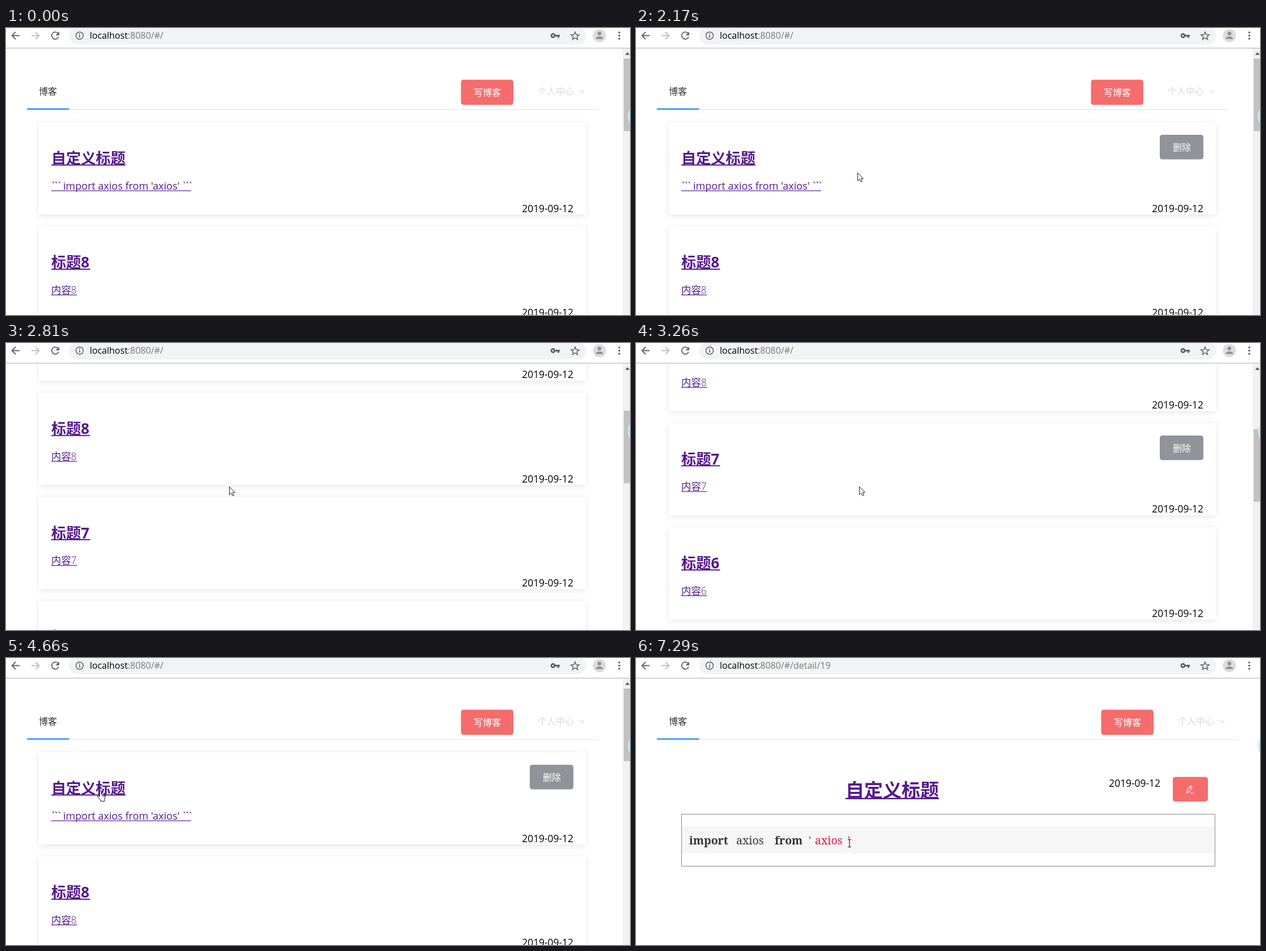
An HTML page for the animation above (8000 ms loop, 1102 by 508 pixels).

```html
<!DOCTYPE html>
<html lang="zh-CN">
<head>
<meta charset="utf-8">
<style>
html, body { margin: 0; width: 100%; height: 100%; overflow: hidden; background: #fff; }
svg { display: block; width: 1102px; height: 508px; }
text { font: 16px "Open Sans", "Noto Sans CJK SC", "Noto Sans CJK", sans-serif; white-space: pre; }
.thin { font-weight: 300; }
.link { fill: #551a8b; }
.link .h { font-size: 26.2px; font-weight: 700; }
.link .p { font-size: 17.4px; }
.date { font-size: 17.4px; text-anchor: end; }
.card { fill: #fff; filter: drop-shadow(0 2px 6px rgba(0,0,0,.1)); }
.code { font: 19.5px "Noto Serif", serif; fill: #333; }
.b { font-weight: 700; }
.line { fill: none; stroke: #5f6368; stroke-width: 1.8; }
</style>
</head>
<body>
<svg viewBox="0 0 1102 508">
  <g id="page">
    <text class="thin" x="58" y="118" fill="#303133">博客</text>
    <rect id="rule" x="37" y="144" height="1" fill="#e4e4e4"/>
    <rect x="37" y="142" width="74.500" height="2.800" fill="#409eff"/>
    <g id="menu">
      <rect x="803.500" y="91.500" width="92.500" height="44.500" rx="4.500" fill="#f56c6c"/>
      <text class="thin" x="826" y="120" fill="#fff">写博客</text>
      <text class="thin" x="939" y="118" fill="#d8d8d8">个人中心</text>
      <path d="M1013 110.500l4 4 4-4" fill="none" stroke="#d8d8d8" stroke-width="1.200"/>
    </g>
    <g id="cards"></g>
  </g>

  <g id="detail">
    <g id="empty">
      <rect x="80.500" y="210.500" width="942" height="2" fill="#eee" stroke="#888"/>
    </g>
    <text class="date" x="926" y="228">2019-09-12</text>
    <rect x="948" y="210.500" width="62" height="43.500" rx="4.500" fill="#f56c6c"/>
    <path d="M973 239l.5-4.500 5.500-8.500 3.500 2.200-5.500 8.500zM977.500 228.300l3.500 2.200M979 239.300h6" fill="none" stroke="#fff" stroke-width="1.100"/>
    <g id="article">
      <text class="link b" x="370" y="246" style="font-size:33px">自定义标题</text>
      <rect class="link" x="370" y="247.500" width="165" height="2.500"/>
      <rect x="80.500" y="276.500" width="942" height="92" fill="#fff" stroke="#888"/>
      <rect x="81" y="298" width="941" height="48" fill="#f6f6f6"/>
      <text class="code b" x="94" y="330">import</text>
      <text class="code" x="177" y="330">axios</text>
      <text class="code b" x="245" y="330">from</text>
      <text class="code" y="330" style="fill:#d14"><tspan x="305">'</tspan><tspan x="316">axios</tspan><tspan x="374">'</tspan></text>
    </g>
  </g>

  <g id="bar">
    <rect x="1089" y="36" width="13" height="472" fill="#f1f1f1"/>
    <path d="M1093.500 47.500h8l-4-4.500z" fill="#505050"/>
    <rect id="thumb" x="1091" y="54" width="11" height="128.500" fill="#c1c1c1"/>
  </g>
  <circle cx="1122" cy="156" r="24" fill="#b5f8ee" opacity=".85"/>

  <rect width="1102" height="36" fill="#fff"/>
  <rect y="35" width="1102" height="1.200" fill="#b8b8b8"/>
  <rect x="111" y="-2" width="914" height="31" rx="15.500" fill="#f1f3f4"/>
  <path class="line" d="M24 13.500H11M17 7l-6.500 6.500 6.500 6.500"/>
  <path class="line" d="M45 13.500h13M52 7l6.500 6.500-6.500 6.500" style="stroke:#bdbfc1"/>
  <path class="line" d="M92 9.500a6.300 6.300 0 1 0 1 6"/>
  <path d="M94 6.500v6.500h-6.500z" fill="#5f6368"/>
  <circle class="line" cx="130" cy="13.500" r="6.500" style="stroke-width:1.500"/>
  <path class="line" d="M130 12.500v4.500M130 9.500v1.700"/>
  <text x="148" y="19">localhost<tspan id="path" fill="#777"></tspan></text>
  <circle class="line" cx="966" cy="13.500" r="3" style="stroke-width:2.800"/>
  <path class="line" d="M969 13.500h9M975.500 13v4.500" style="stroke-width:2.800"/>
  <path class="line" d="M1005 7l2 4.700 5.200.4-4 3.300 1.300 5-4.500-2.700-4.500 2.700 1.300-5-4-3.300 5.200-.4z" style="stroke-width:1.500"/>
  <circle cx="1048" cy="13.500" r="11.500" fill="#dcdcdc"/>
  <circle cx="1048" cy="9.800" r="3.300" fill="#909090"/>
  <path d="M1041.500 19.500c0-6 13-6 13 0z" fill="#909090"/>
  <g fill="#5f6368"><circle cx="1083" cy="8" r="1.800"/><circle cx="1083" cy="13.500" r="1.800"/><circle cx="1083" cy="19" r="1.800"/></g>

  <g id="cursor" stroke-linejoin="round">
    <path id="arrow" d="M.5.5v14l3.300-3 2.300 5 2.300-1-2.200-4.900h4.200z" fill="#fff" stroke="#223"/>
    <path id="hand" d="M-1.500 1.500q1.500-2 3 0v6l5 1.200q2 .5 2 2.500l-1.500 5v3.300h-7v-2l-5.500-6.500q0-2 2-1.200l2 1.700zM4 8.500v3M6.500 9v3" fill="#fff" stroke="#111"/>
    <path id="beam" d="M-3-6.500h2.200l.8.700.8-.7H3M-3 6.500h2.200l.8-.7.8.7H3M0-6V6" fill="none" stroke="#222" stroke-width="1.200"/>
  </g>
</svg>
<script>
const $ = id => document.getElementById(id);
const LOOP = 8000, TOP = 167, PITCH = 184.4, CARD_H = 163;

// Bursts of movement: first change, last change, number of steps
const bursts = [[70, 850, 11], [1030, 1240, 4], [2170, 2400, 4], [2570, 3110, 8], [3260, 3260, 1],
  [3490, 3730, 4], [3940, 4660, 11], [5140, 5140, 1], [5290, 5670, 6], [6680, 6980, 5], [7290, 7290, 1]];

// time, x, y
const moves = [[70, 430, 489], [300, 340, 385], [600, 205, 262], [850, 166, 218], [1030, 176, 224],
  [1170, 290, 273], [1240, 352, 264], [2170, 391, 256], [2250, 397, 243], [2400, 394, 254],
  [4170, 394, 254], [4450, 235, 242], [4660, 167, 234], [5290, 190, 246], [5670, 371, 333],
  [6680, 363, 333], [6755, 351, 331], [6980, 376, 326], [7290, 377, 328]];

// time, scroll offset
const scrolls = [[2400, 0], [2570, 40], [2801, 263], [3110, 394], [3400, 394], [3490, 345],
  [3730, 126], [3940, 90], [4156, 0]];

function snap(t) {
  let now = 0;
  for (const [a, b, n] of bursts) {
    if (t < a) break;
    const step = (b - a) / (n - 1) || 1;
    now = t >= b ? b : a + Math.floor((t - a) / step) * step;
  }
  return now;
}

function at(keys, t) {
  const i = keys.findIndex(k => k[0] > t);
  if (i === 0) return keys[0].slice(1);
  if (i < 0) return keys.at(-1).slice(1);
  const [t0, ...from] = keys[i - 1], [t1, ...to] = keys[i];
  return from.map((v, j) => v + (to[j] - v) * (t - t0) / (t1 - t0));
}

function card(i) {
  const head = i ? `标题${9 - i}` : '自定义标题';
  const body = i ? `内容${9 - i}` : `<tspan x="78.5" letter-spacing="-4.7">\`\`\`</tspan>` +
    `<tspan x="101" font-size="18">import axios from 'axios'</tspan><tspan x="310" letter-spacing="-4.7">\`\`\`</tspan>`;
  return `<g transform="translate(0 ${TOP + i * PITCH})">
    <rect class="card" x="58" width="966" height="${CARD_H}"/>
    <g class="link"><g class="title">
      <text class="h" x="80" y="73">${head}</text>
      <rect x="80" y="74.500" width="${i ? 68.5 : 131}" height="2"/></g>
      <text class="p${i ? ' thin' : ''}" x="80" y="118.500">${body}</text>
      <rect x="80" y="120.500" width="${i ? 45.5 : 247}" height="1.200"/></g>
    <text class="date" x="1002" y="158.500">2019-09-12</text>
    <g class="del"><rect x="925" y="22" width="77" height="43.500" rx="4.500" fill="#909399"/>
      <text class="thin" x="948" y="50" fill="#fff">删除</text></g></g>`;
}

$('cards').innerHTML = Array.from({ length: 9 }, (_, i) => card(i)).join('');
const dels = document.querySelectorAll('.del');
const title = document.querySelector('.title');
const show = (el, on) => { el.style.display = on ? '' : 'none'; };
const shift = (id, x, y) => $(id).setAttribute('transform', `translate(${x} ${y})`);

function draw(ms) {
  const t = snap(ms % LOOP);
  const [x, y] = at(moves, t), [s] = at(scrolls, t);
  const detail = t >= 5290, loaded = t >= 7290;

  show($('cards'), !detail);
  show($('bar'), !detail);
  show($('detail'), detail);
  show($('empty'), !loaded);
  show($('article'), loaded);
  shift('page', 0, -s);
  shift('thumb', 0, s * .25);
  shift('menu', detail ? 18 : 0, 0);
  $('rule').setAttribute('width', detail ? 1027 : 1009);
  $('path').textContent = detail ? ':8080/#/detail/19' : ':8080/#/';
  title.style.fill = t >= 5140 ? '#f00' : '';

  // Hover is refreshed only while the page rests
  const resting = s === 0 || (t >= 3260 && t < 3490);
  dels.forEach((el, i) => {
    const dy = y + s - TOP - i * PITCH;
    show(el, t >= 70 && resting && dy >= 0 && dy <= CARD_H);
  });

  const over = (w, y0, y1) => x >= 80 && x <= 80 + w && y >= y0 && y <= y1;
  const hand = !detail && s === 0 && (over(131, 212, 250) || over(247, 266, 290));
  show($('cursor'), t >= 70);
  show($('hand'), hand);
  show($('beam'), loaded);
  show($('arrow'), !hand && !loaded);
  shift('cursor', x, y);
}

function frame() {
  draw(performance.now());
  requestAnimationFrame(frame);
}
frame();
</script>
</body>
</html>
```
